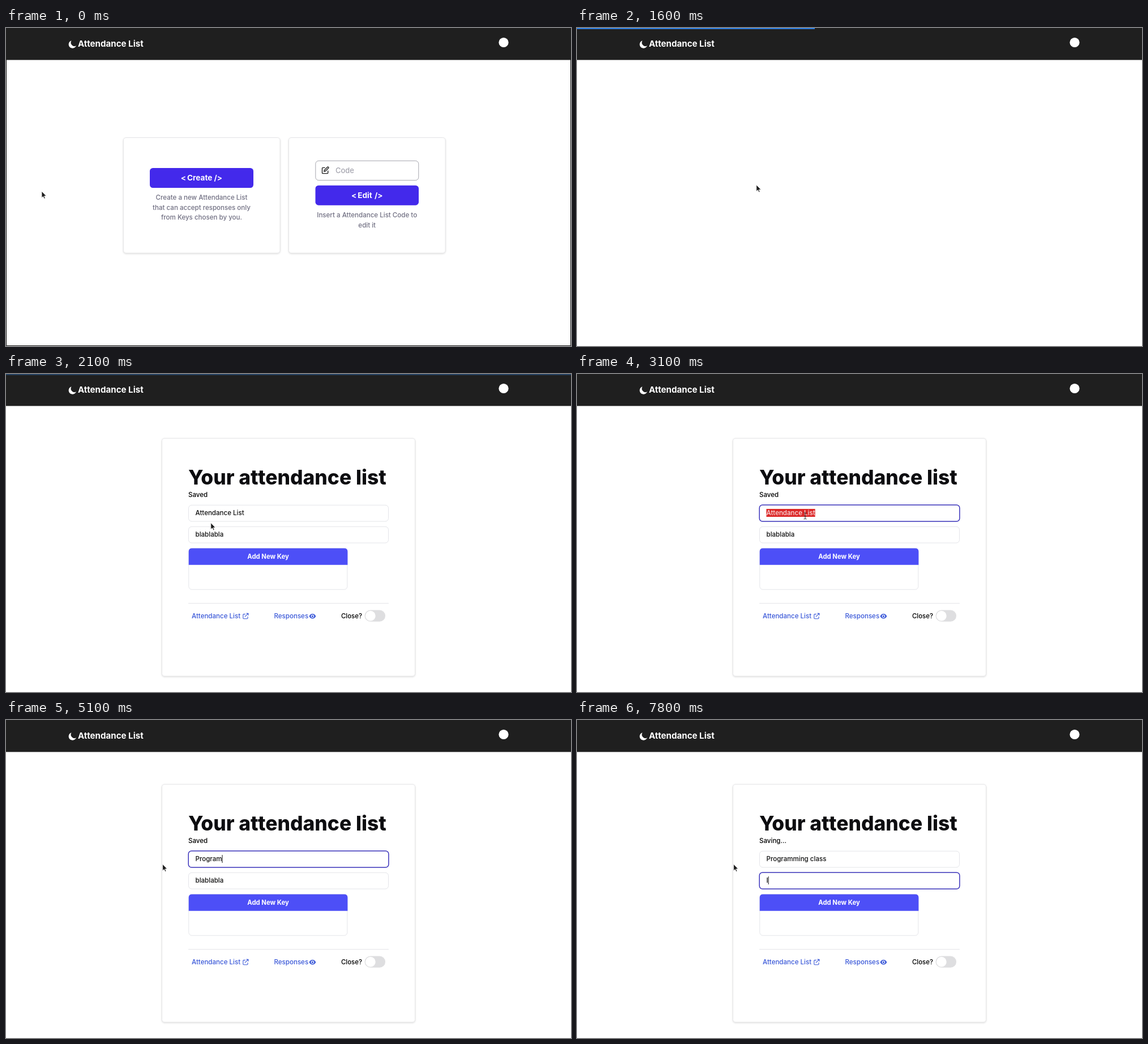
Animation of 998x561 px, one loop 8000 ms. Source, as an HTML page:

```html
<!DOCTYPE html>
<html lang="en">
<head>
<meta charset="utf-8">
<title>Attendance List</title>
<style>
  html, body { margin: 0; width: 100%; height: 100%; overflow: hidden; background: #fff; }
  svg { display: block; width: 998px; height: 561px; }
  text { font: 450 11.55px Inter, Roboto, sans-serif; font-optical-sizing: none; white-space: pre; }
  .mid { text-anchor: middle; }
  .card { fill: #fff; stroke: #e6e6e8; filter: drop-shadow(0 1.5px 1.5px rgba(0,0,0,.14)); }
  .btn { fill: #4329eb; }
  .cta { font-size: 13.6px; font-weight: 650; fill: #fff; }
  .note { fill: #706f82; }
  .line { fill: none; stroke: #e4e5e9; }
  .icon { fill: none; stroke-linecap: round; stroke-linejoin: round; }
  #title { font-size: 35.4px; font-weight: 800; fill: #0d0d10; }
  #brand { font-size: 15.1px; font-weight: 700; fill: #fff; }
</style>
</head>
<body>
<svg viewBox="0 0 998 561">
  <g id="home">
    <path d="M.5 56V560.5H997.5V56" fill="none" stroke="#111"/>
    <rect class="card" x="207.5" y="193.5" width="276.5" height="203.5" rx="4.5"/>
    <rect class="card" x="499.5" y="193.5" width="276.5" height="203.5" rx="4.5"/>
    <rect class="btn" x="254" y="247" width="183" height="35" rx="5.5"/>
    <text class="cta" y="269"><tspan x="308.8">&lt;</tspan><tspan x="320">Create</tspan><tspan x="367.5">/&gt;</tspan></text>
    <g class="note mid">
      <text x="345.5" y="303">Create a new Attendance List</text>
      <text x="345.5" y="320.7">that can accept responses only</text>
      <text x="345.5" y="338.2">from Keys chosen by you.</text>
      <text x="637.7" y="334">Insert a Attendance List Code to</text>
      <text x="637.7" y="351.5">edit it</text>
    </g>
    <rect x="546.8" y="234.3" width="182" height="34.4" rx="5.5" fill="#fff" stroke="#a5a5ad"/>
    <path class="icon" stroke="#222" stroke-width="1.4" d="M563 246.4h-3.3q-1.2 0-1.2 1.2v7.8q0 1.2 1.2 1.2h7.8q1.2 0 1.2-1.2v-3.3M567.6 245.4q1-.9 1.9 0t0 1.9l-5.3 5.2-2.4.6.6-2.4z"/>
    <text x="582" y="256" style="font-size:12.9px" fill="#a5a5af">Code</text>
    <rect class="btn" x="546.5" y="277.7" width="182.5" height="35" rx="5.5"/>
    <text class="cta" y="299.6"><tspan x="609.9">&lt;</tspan><tspan x="621.3">Edit</tspan><tspan x="651">/&gt;</tspan></text>
  </g>

  <g id="form">
    <rect class="card" x="275.5" y="113.5" width="447" height="419.5" rx="4.5"/>
    <text id="title" x="322" y="194.5">Your attendance list</text>
    <text id="status" x="322" y="217"></text>
    <g id="fields"></g>
    <rect class="line" x="322.8" y="307.5" width="280" height="72.7" rx="5.5"/>
    <path id="addKey" d="M322.7 336.7V313q0-5.6 5.6-5.6H597.8q5.6 0 5.6 5.6V336.7z"/>
    <text class="mid" x="463" y="325.8" fill="#fff" style="font-size:11.3px;font-weight:700">Add New Key</text>
    <path class="line" d="M322 404.5H676"/>
    <g id="links">
      <text x="328" y="431">Attendance List</text>
      <path class="icon" stroke="currentColor" stroke-width="1.1" d="M422.3 423.6h-2.3q-1.2 0-1.2 1.2v5.8q0 1.2 1.2 1.2h5.8q1.2 0 1.2-1.2v-2.3M424.7 422.2h3.2v3.2M427.7 422.4l-5.4 5.4"/>
      <text x="473.5" y="431">Responses</text>
      <path d="M535.4 427.3q2.3-4.3 6-4.3t6 4.3q-2.3 4.3-6 4.3t-6-4.3z"/>
      <circle cx="541.4" cy="427.3" r="2.2" fill="none" stroke="#fff" stroke-width="1.1"/>
    </g>
    <text x="592" y="431" style="font-size:11.4px">Close?</text>
    <rect x="633.5" y="416.5" width="36.5" height="20.3" rx="10.1" fill="#dedee0"/>
    <circle cx="643.8" cy="426.7" r="8.9" fill="#fff"/>
  </g>

  <rect width="998" height="56.4" fill="#1f1f1f"/>
  <path d="M115.6 22.2a6.9 6.9 0 1 0 8.4 9.1a6.4 6.4 0 0 1-8.4-9.1z" fill="#fff"/>
  <text id="brand" x="127" y="32.8">Attendance List</text>
  <circle cx="879" cy="25.5" r="8.6" fill="#fff"/>
  <rect id="bar" height="2" fill="#2f80e4"/>

  <g id="mouse">
    <path id="arrow" d="M0 0V11.6L2.7 9.2 4.5 13.2 6.3 12.4 4.6 8.5H8.2z" fill="#1c1c1c" stroke="#fff" stroke-width=".8"/>
    <path id="hand" d="M-1.1 1q0-1.1 1.1-1.1T1.1 1v4.2q1.5-.7 2.1.4 1.5-.6 2.1.6 1.9-.4 1.9 1.2v2.2q0 1.3-.8 2.2v1.8H-.2v-1.6L-3.4 8.4q-.8-1.1.2-1.6t2.1 1.2z" fill="#fff" stroke="#222"/>
    <path id="beam" d="M-2.5-5.5Q0-5.5 0-4.2 0-5.5 2.5-5.5M0-4.2V4.7M-2.5 6Q0 6 0 4.7 0 6 2.5 6M-1.5 1H1.5" fill="none" stroke="#333"/>
  </g>
</svg>

<script>
const LOOP = 8000, TEXT_X = 334.5, NS = "http://www.w3.org/2000/svg";
const $ = id => document.getElementById(id);
const clamp = v => Math.max(0, Math.min(1, v));
const set = (el, attrs) => { for (const k in attrs) el.setAttribute(k, attrs[k]); };
const show = (el, on) => { el.style.visibility = on ? "visible" : "hidden"; };
const add = (parent, tag, attrs) => {
  const el = document.createElementNS(NS, tag);
  set(el, attrs);
  return parent.appendChild(el);
};

// Piecewise linear value from rows of [time, ...values]
function track(rows, t) {
  let i = 0;
  while (i < rows.length - 2 && t >= rows[i + 1][0]) i++;
  const a = rows[i], b = rows[i + 1], k = clamp((t - a[0]) / (b[0] - a[0]));
  return a.slice(1).map((v, n) => v + (b[n + 1] - v) * k);
}
const rgb = v => `rgb(${v.map(Math.round)})`;

const MOUSE = [
  [0, 63, 288], [200, 96, 288], [400, 218, 284], [600, 302, 280], [700, 310, 279],
  [1500, 310, 279], [1800, 330.5, 272], [2400, 393, 253], [2700, 403, 250],
  [3300, 403, 250], [3400, 366, 252], [3500, 302, 254], [3600, 276.6, 254.3]
];
const BAR = [[1100, 0], [1300, 120], [1600, 420], [1700, 720], [1800, 982], [1900, 998]];
const FADE_OUT = [[1400, 1], [1600, 0]];
const FADE_IN = [[1600, 0], [1700, .25], [1800, .57], [1900, .82], [2100, 1]];
const BUTTON = [[1800, 93, 68, 244], [2100, 77, 79, 247]];
const LINK = [[1800, 90, 64, 235], [2100, 58, 88, 216]];

const NAME = "Programming class";
const KEYS = [4000, 4100, 4400, 4500, 4600, 4800, 4900, 5300, 5500, 5600, 5700, 6100, 6200, 6300, 6400, 6600, 6700];
const SAVING = [[4000, 5100], [5300, 5900], [6100, 6900], [7800, 8000]];

function field(y) {
  const g = $("fields");
  add(g, "rect", { x: 322.5, y: y + .3, width: 353, height: 28.7, rx: 5.5, class: "line" });
  const ring = add(g, "rect", {
    x: 322.2, y: y - .1, width: 353.7, height: 29.2, rx: 5.5,
    fill: "none", stroke: "#3d35bd", "stroke-width": 1.5
  });
  const mark = add(g, "rect", { y: y + 7, height: 14, fill: "#dc2828" });
  const text = add(g, "text", { x: TEXT_X, y: y + 18 });
  const plain = add(text, "tspan", { fill: "#111" });
  const marked = add(text, "tspan", { fill: "#f8dede" });
  const caret = add(g, "rect", { y: y + 7, width: 1, height: 14, fill: "#111" });
  // The selection runs from letter sel to the end
  return (value, focus, sel, hasCaret) => {
    plain.textContent = value.slice(0, sel);
    marked.textContent = value.slice(sel);
    const len = text.getComputedTextLength(), from = plain.getComputedTextLength();
    ring.style.opacity = focus;
    set(mark, { x: TEXT_X + from, width: len - from });
    set(caret, { x: TEXT_X + len });
    show(caret, hasCaret);
  };
}
const first = field(231), second = field(269);

function draw(t) {
  const home = track(FADE_OUT, t)[0], form = track(FADE_IN, t)[0];
  $("home").style.opacity = home;
  $("form").style.opacity = form;
  set($("form"), { transform: `translate(0 ${(1 - form) * 14})` });
  set($("addKey"), { fill: rgb(track(BUTTON, t)) });
  const link = rgb(track(LINK, t));
  set($("links"), { fill: link, color: link });

  set($("bar"), { width: track(BAR, t)[0] });
  $("bar").style.opacity = clamp((2200 - t) / 300);

  const typed = KEYS.filter(k => k <= t).length;
  const inFirst = t < 7300, started = t >= 7800;
  const focus = inFirst ? clamp((t - 2700) / 200) : clamp((7500 - t) / 200);
  const sel = typed || t < 2900 ? LOOP : t < 3000 ? 11 : 0;
  first(typed ? NAME.slice(0, typed) : "Attendance List", focus, sel, inFirst && (typed > 0 || t === 2800));
  second(started ? "I" : "blablabla", clamp((t - 7200) / 200), inFirst || started ? LOOP : 0, started);
  $("status").textContent = SAVING.some(([a, b]) => t >= a && t < b) ? "Saving..." : "Saved";

  const [x, y] = track(MOUSE, t);
  const hand = t < 1600 && x > 254 && y < 282;
  const beam = t > 1800 && x > 322 && y < 260;
  set($("mouse"), { transform: `translate(${x} ${y})` });
  show($("hand"), hand);
  show($("beam"), beam);
  show($("arrow"), !hand && !beam);
}

// The picture advances in steps of 100 ms, like a screen recording
const start = performance.now();
let last = -1;
function tick() {
  const t = Math.floor((performance.now() - start) % LOOP / 100) * 100;
  if (t !== last) draw(last = t);
  requestAnimationFrame(tick);
}
tick();
</script>
</body>
</html>
```
